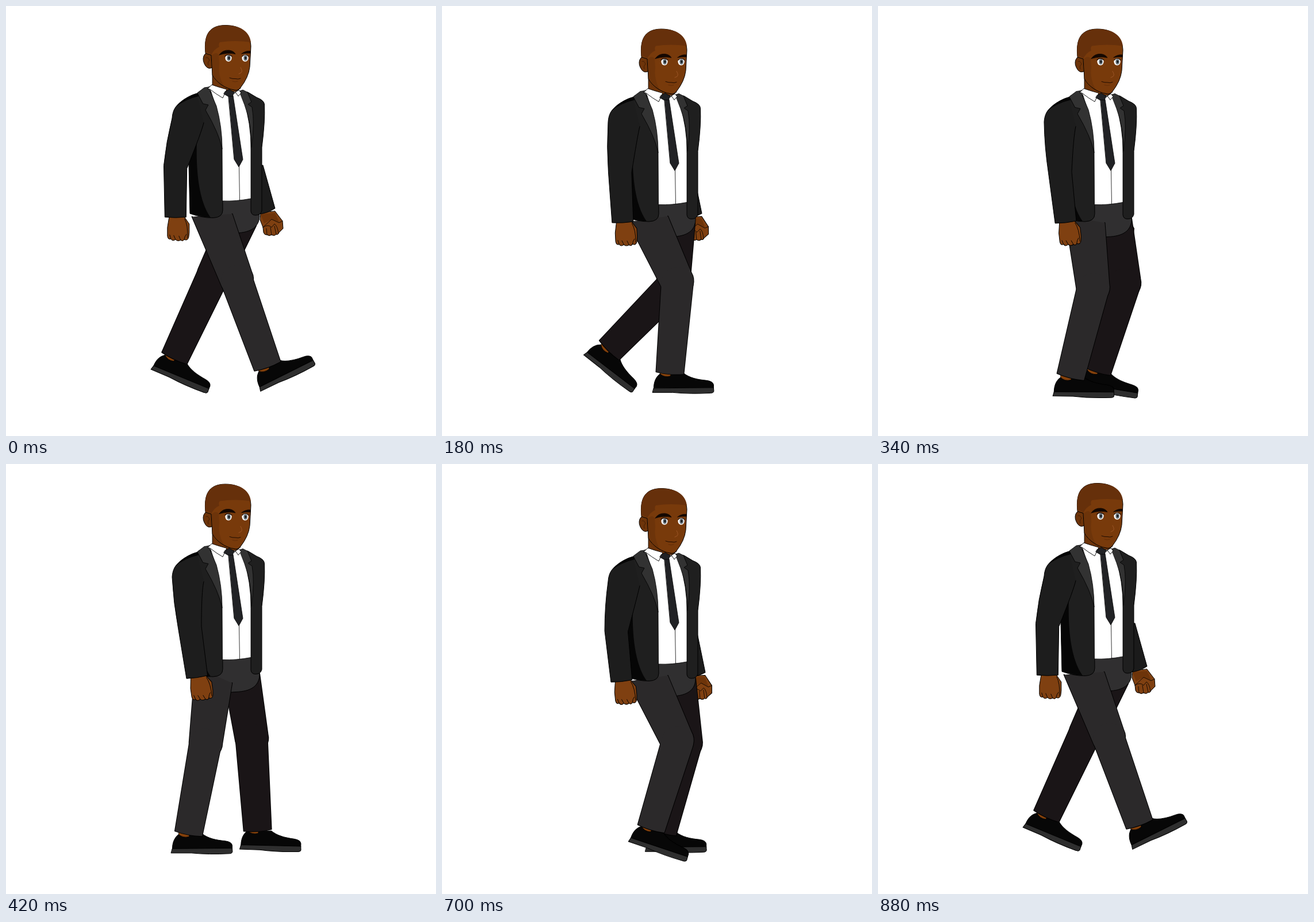
Write an HTML page with a canvas that moves like this. It is 748 px wide and 748 px high and loops after 0.9 s.

```html
<!DOCTYPE html>
<html lang="en">
<head>
<meta charset="utf-8">
<title>Walk cycle</title>
<style>
html, body { margin: 0; width: 100%; height: 100%; overflow: hidden; background: #fff; }
canvas { display: block; width: 748px; height: 748px; }
</style>
</head>
<body>
<canvas id="stage"></canvas>
<script>
const LOOP = 900, STEP = 20, SIZE = 748, RAD = Math.PI / 180;
const canvas = document.getElementById('stage');
const ctx = canvas.getContext('2d');
const ratio = window.devicePixelRatio || 1;
canvas.width = canvas.height = SIZE * ratio;

// Key poses: limb angles from straight down (forward is positive), shoe tilt, body drop
const times = [0, 180, 260, 340, 420, 490, 560, 700, 880];
const tracks = {
  drop:      [0, 6.5, 8.3, 6.5, 1.5, 1.5, 4.5, 9],
  nearThigh: [22.2, 26.3, 18.5, 8, -5.4, -11, 5.6, 26.5],
  nearCalf:  [19.7, -4.7, -10.5, -14.3, -10.6, -26, -31, -17],
  nearShoe:  [-26, 0, 0, 1, 0, 24, 31, 19],
  farThigh:  [-24.2, -3, 5, 10.2, 9.7, 18, 17.2, 8],
  farCalf:   [-25, -44.5, -33, -17.3, 3.8, 4, -3.8, -14.7],
  farShoe:   [23, 38, 26, 10, 2, -6, 1, 0],
  upperArm:  [-14.6, -4.6, -2, 0, 2, 0, -3.6, -8.8],
  foreArm:   [0, 2.9, 4.8, 6.3, 8.1, 8, 6.8, 5.8],
  farCuff:   [468, 452, 444, 436, 428, 434, 445, 458],
  farArm:    [16, 12, 9, 7, 5, 6, 8, 12]
};

const skin = '#7f4011', face = '#783a0b', shade = '#6d340a';
const cloth = '#2b292a', darkCloth = '#1a1517', suit = '#1f1f1f', tie = '#212225';

// Periodic monotone cubic through the key values
function sample(v, t) {
  const n = v.length;
  const at = i => v[(i + n) % n];
  const span = i => { const k = (i + n) % n; return times[k + 1] - times[k]; };
  const slope = i => (at(i + 1) - at(i)) / span(i);
  const tangent = i => {
    const a = slope(i - 1), b = slope(i);
    return a * b <= 0 ? 0 : 2 * a * b / (a + b);
  };
  let i = 0;
  while (i < n - 1 && t >= times[i + 1]) i++;
  const h = span(i), s = (t - times[i]) / h, r = 1 - s;
  return at(i) * (1 + 2 * s) * r * r + at(i + 1) * s * s * (3 - 2 * s)
    + h * s * r * (r * tangent(i) - s * tangent(i + 1));
}

function shape(d, fill, line, width = 1) {
  const p = new Path2D(d);
  if (fill) { ctx.fillStyle = fill; ctx.fill(p); }
  if (line) { ctx.strokeStyle = line; ctx.lineWidth = width; ctx.stroke(p); }
}

function placed(x, y, deg, draw) {
  ctx.save();
  ctx.translate(x, y);
  ctx.rotate(deg * RAD);
  draw();
  ctx.restore();
}

const reach = (p, len, deg) => ({ x: p.x + len * Math.sin(deg * RAD), y: p.y + len * Math.cos(deg * RAD) });
const side = (p, w, deg) => reach(p, w, deg + 90);
const xy = p => `${p.x} ${p.y}`;

function shoe() {
  shape('M-28 26C-28 15 -24 6 -17 1L24 0C34 8 48 11 64 12.5Q75 14 76 20L76 26Z', '#070707', '#000');
  shape('M-28 26L76 25L76.500 31Q76 34.500 71 34.500Q36 36.500 5 33.500L-30 33.500Z', '#2e2e2e', '#000');
  shape('M-17 1Q-10 8 1 5L3 -4L-17 -4Z', '#84410c', '#000', 0.7);
}

const calfPath = 'M-27.5 0A27.5 27.5 0 0 1 27.5 0L24 157.5Q0 161.5 -24 157.5Z';

function leg(hip, front, thigh, calf, tilt, color) {
  const knee = reach(hip, 117, thigh), ankle = reach(knee, 158, calf);
  const thighPath = `M${front} 6L29.500 112A28.500 28.500 0 0 1 -28 116L-30 -16`;
  placed(ankle.x, ankle.y, tilt, shoe);
  // Outline both parts first so that no line crosses the knee
  for (const [fill, line] of [[null, '#000'], [color, null]]) {
    placed(hip.x, hip.y, -thigh, () => shape(thighPath, fill, line, 2));
    placed(knee.x, knee.y, -calf, () => shape(calfPath, fill, line, 2));
  }
}

function farArm(x, y, deg) {
  placed(x, y, 16 - deg, () => {
    shape('M-25 8L-26 20L-21 33L-20 42Q-18 47 -14 46Q-10 49 -6 46Q-1 49 2 45Q5 47 7 42L14 35L13 22L0 5Z', skin, '#000');
    shape('M-25 10L-19 26L-6 19L7 24L0 8Z', shade);
    shape('M-21 33L-6 19L7 25L13 22M-21 33Q-12 27 -6 33L-1 27Q4 30 6 43M-14 46L-15 35M-6 46L-8 33M2 45L-1 31', null, '#000', 0.8);
    shape('M-52 -75L-21 -75L0 0Q-14 9 -28 10Z', '#1b1b1b', '#000');
  });
}

function nearArm(s, upper, fore) {
  const elbow = reach(s, 88, upper), cuff = reach(elbow, 87, fore), mid = (upper + fore) / 2;
  const outer = side(elbow, -20.5, mid);
  placed(cuff.x, cuff.y, -fore, () => {
    shape('M-11 0L-14 18L-14 33Q-13 40 -8 38Q-5 43 0 39Q4 43 9 40Q13 43 15 39Q21 42 23 35L24 27L24 12L15 -1Z', skin, '#000');
    shape('M-8 38L-10 31M0 39L-3 32M9 40L6 33M15 39Q16 33 19 30M16 3Q22 14 21 36', null, '#000', 0.9);
  });
  shape(`M${s.x + 27} ${s.y + 8}Q${s.x + 23} ${s.y + 25} ${xy(side(elbow, 20, mid))}
    L${xy(side(cuff, 18.5, fore))}Q${cuff.x} ${cuff.y + 2} ${xy(side(cuff, -18.5, fore))}
    L${xy(outer)}Q${(outer.x + s.x - 28) / 2 - 3} ${(outer.y + s.y) / 2} ${s.x - 28} ${s.y}
    C${s.x - 27} ${s.y - 14} ${s.x - 22} ${s.y - 21} ${s.x - 14} ${s.y - 27}
    Q${s.x} ${s.y - 39} ${s.x + 15} ${s.y - 43}`, '#1d1d1d', '#000');
  shape(`M${s.x + 17} ${s.y - 43}Q${s.x - 10} ${s.y - 36} ${s.x - 21} ${s.y - 20}Q${s.x - 4} ${s.y - 33} ${s.x + 18} ${s.y - 38}Z`, '#050505');
}

function pelvis() {
  shape('M332 350L376 334L440 330L441 366C440 384 427 394 400 395L384 396L350 376Z', '#302f30', '#000');
}

function torso() {
  shape('M421 150L436 159Q449 164 449.500 171Q451 200 445 246L445 356Q443 364 434 364Q427 364 426 357L426 240L410 150Z', suit, '#000');
  shape('M335 150L302 182L318 275L320 361Q340 368.500 360 368.500Q377 368 377 355L376 245L356 148Z', suit, '#000');
  shape('M332 230C330 290 336 340 356 368L345 367L320 361L318 275Z', '#060606');
  shape('M353 140L372 143L405 147L412 158Q427 205 426 250L426 335Q400 340 376.500 339L376 250Q374 195 357 150Z', '#fff', '#000', 0.8);
  shape('M405.500 278L406.500 338', null, '#000', 0.8);
}

function lapels() {
  shape('M333 151L345 142L352 141Q359 158 366 174Q376 210 376 249Q371 222 347 181L352 172L343 170Z', '#323232', '#000', 0.8);
  shape('M406 148L412 146L420 150L427 167L421 171L428 176Q433 205 427 246Q427 204 415 172Z', '#323232', '#000', 0.8);
  shape('M387 156L395 156L412 267L405 280L397 267Z', tie, '#000', 0.8);
}

function eye(x) {
  const oval = (w, h, dx, color) => {
    ctx.beginPath();
    ctx.ellipse(x + dx, 90.5, w, h, 0, 0, Math.PI * 2);
    ctx.fillStyle = color;
    ctx.fill();
  };
  oval(5.6, 6.2, 0, '#fff');
  oval(3.3, 4.8, 0.5, '#6f7a82');
  oval(1.6, 2.4, 0.8, '#15191c');
}

function head() {
  shape('M359 106L359 138Q368 145 384 149L400 149L408 143L402 110Z', shade, '#000', 0.8);
  shape('M357 84Q348 78 344 87Q341 95 347 104Q352 111 359 107', shade, '#000');
  shape('M348 90Q352 88 354 95Q350 97 352 103', null, '#3b1903', 0.8);
  shape('M347 82C344 52 352 34 381 33.500C410 33.500 425 48 426 70Q425 90 424 106Q422 124 408 142Q403 148 397 146C382 144 366 133 359 120L357 86Z', face, '#000');
  shape('M358 86Q366 78 370 86L371 100Q368 118 378 138Q364 130 359.500 119Z', shade);
  shape('M347 82C344 52 352 34 381 33.500C410 33.500 424 46 426 63Q398 59 372 63Q369 66 371 71Q362 75 357 85Q350 79 347 82Z', '#66300b');
  shape('M371 85Q377 76 388 77Q396 78 399 83.500Q386 80.500 371 85Z', '#140802', '#140802', 0.8);
  shape('M410 83Q417 77.500 425 78.500L425 82Q418 81.500 410 83Z', '#140802', '#140802', 0.8);
  eye(387);
  eye(416);
  shape('M381 87.500Q386 82 393 87.500M411 87.500Q416 82 422 87.500', null, '#1b0a02', 1.2);
  shape('M408 107Q412 113 409 116L405 118', null, '#a0582a', 0.9);
  shape('M389 125Q394 127 399 126.500Q404 128 408 126', null, '#1d0b02', 1);
  shape('M394 131Q399 133 403 131', null, '#5c2a08', 0.8);
}

function collar() {
  shape('M351 144L358 137Q369 141 384 145L377 160Q365 153 355 145Z', '#fff', '#000', 0.9);
  shape('M396 152L405 146L409 151L404 157L400 151Z', '#fff', '#000', 0.9);
  shape('M381 149L388 145L397 150L394 157L386 157L379 153Z', tie, '#000', 0.8);
}

function draw(t) {
  const p = {};
  for (const name in tracks) p[name] = sample(tracks[name], t);
  ctx.setTransform(ratio, 0, 0, ratio, 0, 0);
  ctx.fillStyle = '#fff';
  ctx.fillRect(0, 0, SIZE, SIZE);
  ctx.lineJoin = ctx.lineCap = 'round';
  ctx.translate(0, p.drop);
  farArm(p.farCuff, 352 + (468 - p.farCuff) * 0.15, p.farArm);
  leg({ x: 407.5, y: 363 }, 33, p.farThigh, p.farCalf, p.farShoe, darkCloth);
  pelvis();
  leg({ x: 357.5, y: 370 }, 36.5, p.nearThigh, p.nearCalf, p.nearShoe, cloth);
  torso();
  nearArm({ x: 317, y: 195 }, p.upperArm, p.foreArm);
  lapels();
  head();
  collar();
}

const start = performance.now();
function tick() {
  const t = (performance.now() - start) % LOOP;
  draw(Math.floor(t / STEP) * STEP);
  requestAnimationFrame(tick);
}
tick();
</script>
</body>
</html>
```
